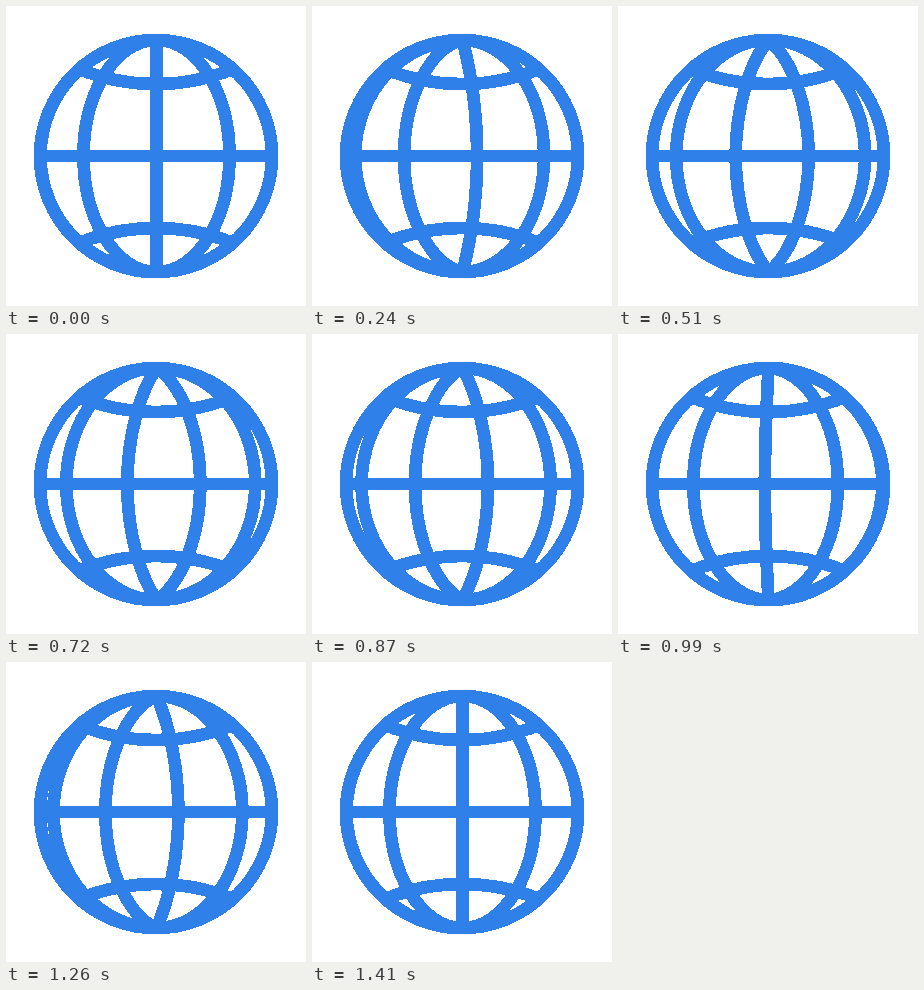
Recreate the animation shown at these times as an HTML page with a canvas. Size 300 by 300 pixels, loop 1440 ms.

```html
<!DOCTYPE html>
<html lang="en">
<head>
<meta charset="utf-8">
<title>Spinning globe</title>
<style>
  html, body { margin: 0; width: 100%; height: 100%; overflow: hidden; background: #fff; }
  canvas { display: block; width: 300px; height: 300px; }
</style>
</head>
<body>
<canvas id="globe" width="300" height="300"></canvas>
<script>
const ctx = document.getElementById('globe').getContext('2d', { willReadFrequently: true });
const SIZE = 300, COLOR = '#2f80e8', EDGE_ALPHA = 32;
const LOOP = 1440, STEP = 30, SPIN_END = 1400, SPIN = 200;
const CENTER = 150, RADIUS = 116, MERIDIAN = 73, AXIS_SHIFT = 0.5;
const LATITUDE_RADIUS = 205, LATITUDE_Y = 72, LATITUDE_HALF_WIDTH = 77;
const KAPPA = 0.5523;

const mix = (a, b, k) => a + (b - a) * k;

function stroke(trace) {
  ctx.beginPath();
  trace();
  ctx.stroke();
}

// A meridian morphs from a straight axis (slot 0) to a half ellipse (slot 1),
// then widens to the rim (slot 2). Negative slots bulge to the left.
function meridian(slot) {
  const d = Math.abs(slot);
  const round = Math.min(d, 1);
  const width = d < 1 ? d * MERIDIAN : mix(MERIDIAN, RADIUS, d - 1);
  const x = AXIS_SHIFT + Math.sign(slot) * width;
  const poleX = mix(AXIS_SHIFT, x, KAPPA);
  const poleY = RADIUS * mix(2 / 3, 1, round);
  const waistY = RADIUS * mix(1 / 3, KAPPA, round);
  stroke(() => {
    ctx.moveTo(AXIS_SHIFT, -RADIUS);
    ctx.bezierCurveTo(poleX, -poleY, x, -waistY, x, 0);
    ctx.bezierCurveTo(x, waistY, poleX, poleY, AXIS_SHIFT, RADIUS);
  });
}

// side is -1 for the northern parallel and 1 for the southern one.
function parallel(side) {
  const spread = Math.asin(LATITUDE_HALF_WIDTH / LATITUDE_RADIUS);
  const middle = -side * Math.PI / 2;
  const cy = side * (LATITUDE_Y + LATITUDE_RADIUS);
  stroke(() => ctx.arc(0, cy, LATITUDE_RADIUS, middle - spread, middle + spread));
}

// Turns soft edges into hard ones and paints everything in one flat colour.
function hardenEdges() {
  const image = ctx.getImageData(0, 0, SIZE, SIZE);
  for (let i = 3; i < image.data.length; i += 4) {
    image.data[i] = image.data[i] > EDGE_ALPHA ? 255 : 0;
  }
  ctx.putImageData(image, 0, 0);
  ctx.globalCompositeOperation = 'source-in';
  ctx.fillStyle = COLOR;
  ctx.fillRect(0, 0, SIZE, SIZE);
  ctx.globalCompositeOperation = 'source-over';
}

function draw(time) {
  const t = Math.floor((time % LOOP) / STEP) * STEP;
  const phase = (Math.min(t, SPIN_END) / SPIN) % 1;

  ctx.clearRect(0, 0, SIZE, SIZE);
  ctx.save();
  ctx.translate(CENTER, CENTER);
  ctx.strokeStyle = COLOR;
  ctx.lineWidth = 12;
  stroke(() => ctx.arc(0, 0, RADIUS, 0, Math.PI * 2));
  stroke(() => { ctx.moveTo(-RADIUS, 0); ctx.lineTo(RADIUS, 0); });
  parallel(-1);
  parallel(1);
  for (let slot = -2; slot < 2; slot++) meridian(slot + phase);
  ctx.restore();
  hardenEdges();
}

const start = performance.now();
function tick() {
  draw(performance.now() - start);
  requestAnimationFrame(tick);
}
tick();
</script>
</body>
</html>
```
